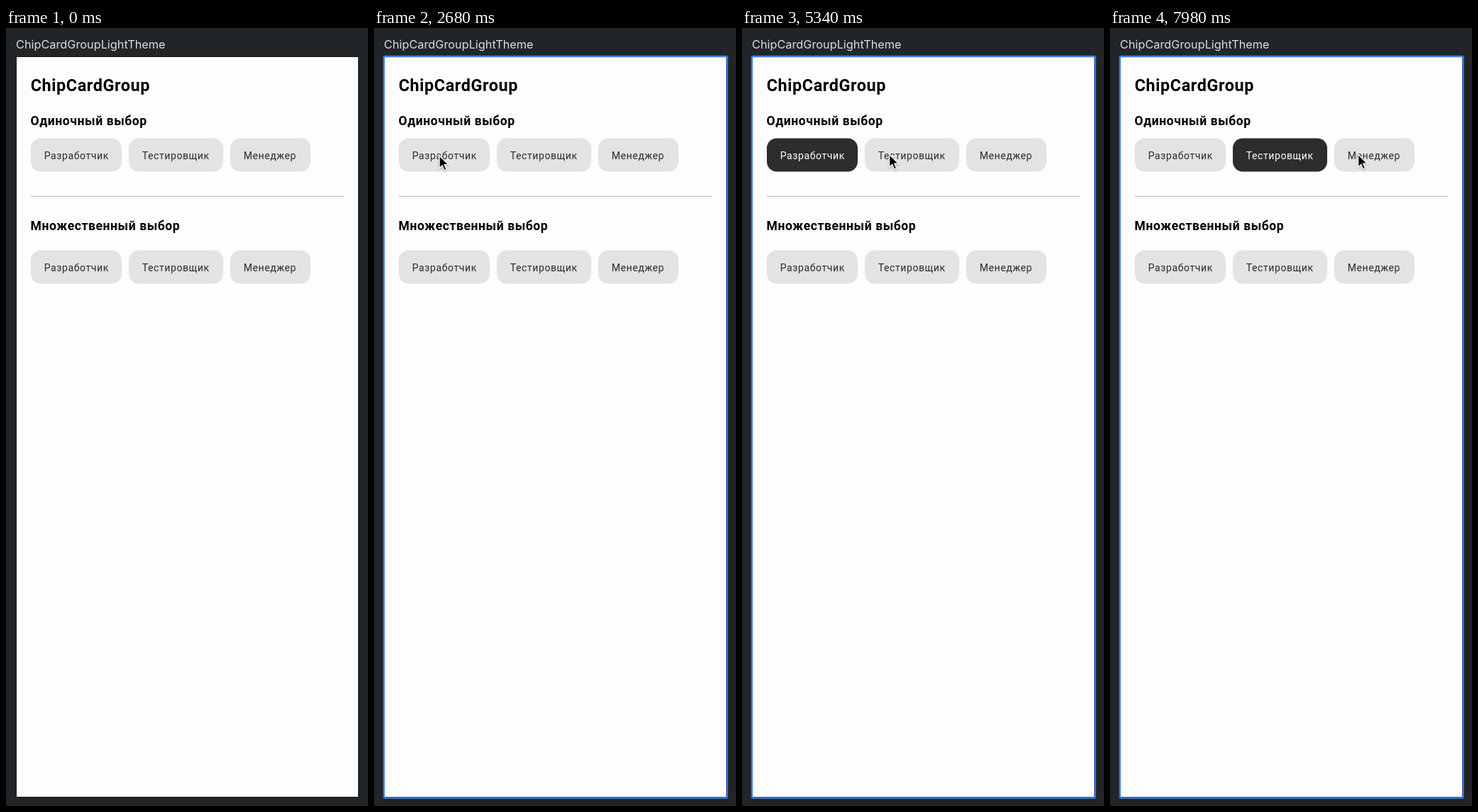
Write an HTML page that moves like this. It is 510 px wide and 1097 px high and loops after 8000 ms.

```html
<!DOCTYPE html>
<html lang="ru">
<head>
<meta charset="utf-8">
<style>
  html, body { margin: 0; width: 100%; height: 100%; overflow: hidden; background: #212528; }
  svg { display: block; width: 510px; height: 1097px; }
  text { font-family: Roboto, "Noto Sans", sans-serif; letter-spacing: .585px; }
  .tab { font: 16.3px Inter, sans-serif; letter-spacing: 0; fill: #dcdee0; }
  .h1 { font-size: 23.4px; font-weight: 700; }
  .h2 { font-size: 17.55px; font-weight: 700; }
  .chip { font-size: 14.04px; }
</style>
</head>
<body>
<svg viewBox="0 0 510 1097">
  <rect width="510" height="1097" fill="#212528"/>
  <text class="tab" x="14" y="29">ChipCardGroupLightTheme</text>
  <rect x="14.5" y="40.5" width="482" height="1044" fill="#fdfdfd" stroke="#15181a"/>
  <rect id="focus" x="14" y="40" width="483.5" height="1045.5" rx="1.5" fill="none" stroke="#3f79e6" stroke-width="2.4"/>
  <text class="h1" x="34.7" y="89.3">ChipCardGroup</text>
  <text class="h2" x="34.5" y="136.5">Одиночный выбор</text>
  <path d="M35 237.6H476.5" stroke="#cac4d0" stroke-width="1.5"/>
  <text class="h2" x="34.5" y="284.7">Множественный выбор</text>
  <g id="chips"></g>
  <circle id="press" fill="#008078"/>
  <path id="cursor" d="M0 0V18.2L4.2 14.4L7 21.2L10.2 19.9L7.3 13.2H13Z" stroke="#fff" stroke-width="1.4"
    style="filter: drop-shadow(0 1px 1px rgba(0,0,0,.3))"/>
</svg>
<script>
const $ = id => document.getElementById(id);
const clamp = v => Math.min(1, Math.max(0, v));
const ramp = (t, a, b) => clamp((t - a) / (b - a));
const mix = (a, b, k) => a + (b - a) * k;
const gray = v => `rgb(${[v, v, v].map(Math.round)})`;

const labels = [['Разработчик', 35, 128], ['Тестировщик', 173, 133], ['Менеджер', 316, 113]];
$('chips').innerHTML = [155.5, 313.5].map(y => labels.map(([name, x, w]) =>
  `<g><rect x="${x}" y="${y}" width="${w}" height="47" rx="14" fill="#e3e3e3"/>
   <text class="chip" x="${x + 18.7}" y="${y + 29}" fill="#2b2b2b">${name}</text></g>`).join('')).join('');
const chips = [...$('chips').children];

// time, x, y of the pointer tip
const route = [
  [300, 470, 300], [700, 213.5, 166], [1240, 213.5, 166], [1960, 92, 179.5],
  [3600, 92, 179.5], [4220, 190, 165], [4900, 207.5, 178],
  [6600, 207.5, 178], [7700, 349.5, 178]
];
// press start, release, x, y
const presses = [[3020, 3300, 91.5, 181.5], [5680, 5960, 207, 178]];

function pointer(t) {
  const i = route.findIndex(p => p[0] > t);
  if (i < 0) return route.at(-1).slice(1);
  const [a, b] = [route[i - 1], route[i]];
  const k = ramp(t, a[0], b[0]), e = k * k * (3 - 2 * k);
  return [mix(a[1], b[1], e), mix(a[2], b[2], e)];
}

function paintChip(chip, k) {
  chip.children[0].setAttribute('fill', gray(mix(227, 45, k)));
  chip.children[1].setAttribute('fill', k > .6 ? '#fff' : '#2b2b2b');
}

function draw(t) {
  const shown = t >= 300;
  $('cursor').style.visibility = shown ? 'visible' : 'hidden';
  $('focus').style.visibility = t >= 340 ? 'visible' : 'hidden';
  if (shown) $('cursor').setAttribute('transform', `translate(${pointer(t)})`);

  const swap = ramp(t, 5800, 6000);
  paintChip(chips[0], ramp(t, 3150, 3370) - swap);
  paintChip(chips[1], swap);

  const [down, up, x, y] = presses[t < 4500 ? 0 : 1];
  const grow = ramp(t, down, down + 140), fade = ramp(t, up, up + 180);
  const press = $('press');
  press.setAttribute('cx', x);
  press.setAttribute('cy', y);
  press.setAttribute('r', mix(20, 33.5, grow) - 9 * fade);
  press.setAttribute('opacity', .13 * grow * (1 - fade));
}

const start = performance.now();
function tick() {
  draw((performance.now() - start) % 8000);
  requestAnimationFrame(tick);
}
tick();
</script>
</body>
</html>
```
